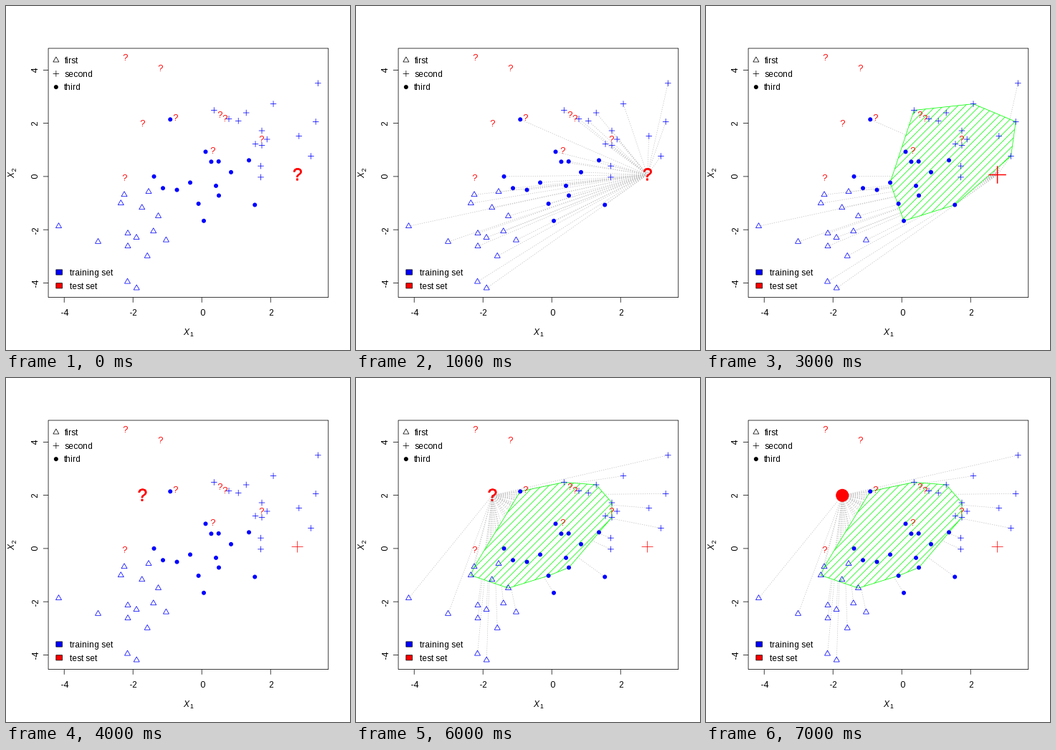
A matplotlib script for the animation above (8 s loop, 480x480 px).

```python
import matplotlib.pyplot as plt
from matplotlib.animation import FuncAnimation
from matplotlib.collections import LineCollection
from matplotlib.patches import Circle, Polygon, Rectangle
from matplotlib.patheffects import withStroke

SIZE = 480
PT = 0.72  # points per pixel at 100 dpi
THIN = 0.75
LINE = 14.4  # margin line height
LEFT, TOP = 4.1 * LINE, 4.1 * LINE
RIGHT, BOTTOM = SIZE - 2.1 * LINE, SIZE - 5.1 * LINE
ZERO = (273.2, 237.9)
UNIT = (48.0, 37.13)
NEIGHBOURS = 25
BLUE, RED, GREEN, GREY = "#0000ff", "#ff0000", "#00ff00", "#bebebe"

plt.rcParams.update({"font.family": "Liberation Sans",
                     "text.hinting_factor": 1})

# Observations: marker centres in pixels, y pointing down
FIRST = [(73.5, 307.3), (128.5, 329), (160.3, 275.3), (165, 263.4), (189.7, 281.4),
         (199, 259.2), (212.5, 293.2), (170, 317.2), (182, 323.2), (205.7, 314.4),
         (223.4, 326.8), (170, 335.2), (197.2, 349), (169.5, 384.8), (182.2, 393.7)]
SECOND = [(290.3, 145.5), (311, 157.5), (324.2, 160.3), (335.2, 149), (373, 136.6),
          (435.3, 107.8), (432.2, 161.4), (408.8, 181.4), (425.5, 209.5), (357, 174),
          (364.2, 186), (348, 192.5), (357, 194.5), (355.5, 223.2), (355.5, 238.9)]
THIRD = [(229.2, 158.3), (206.5, 237.9), (219, 254.2), (238.5, 256.6), (257, 246.4),
         (278.5, 203.4), (286.4, 217.3), (296.7, 216.9), (314, 231.9), (339, 215.3),
         (293, 250.9), (297, 264.5), (268.6, 275.9), (276, 299.8), (347.2, 277.5)]
TESTS = [(166, 71.9), (215, 86.8), (236, 155.8), (298, 152), (304.3, 157.6),
         (356, 185.7), (288.2, 202.6), (165.2, 240.6)]
QUERY_A, QUERY_B = (406.6, 235.5), (190.2, 163.8)
TRAINING = FIRST + SECOND + THIRD

fig = plt.figure(figsize=(4.8, 4.8), dpi=100, facecolor="white")
ax = fig.add_axes([0, 0, 1, 1])
ax.set_xlim(0, SIZE)
ax.set_ylim(SIZE, 0)
ax.axis("off")


def text(x, y, label, size=12, **style):
    return ax.text(x, y, label, fontsize=size * PT, va="baseline",
                   rotation_mode="anchor", **style)


def strokes(segments, color, width=THIN, z=3, **style):
    return ax.add_collection(LineCollection(
        segments, colors=color, linewidths=width * PT, zorder=z,
        snap=False, **style))


def shape(patch, fill, edge, z=4):
    patch.set(facecolor=fill, edgecolor=edge, linewidth=THIN * PT,
              zorder=z, snap=False)
    return ax.add_patch(patch)


def triangle(x, y, color):
    corners = [(x, y - 4.67), (x + 4.04, y + 2.33), (x - 4.04, y + 2.33)]
    shape(Polygon(corners), "none", color)


def plus(x, y, color, half=4.24, width=THIN):
    return strokes([[(x - half, y), (x + half, y)],
                    [(x, y - half), (x, y + half)]], color, width, z=4)


def dot(x, y, color, radius=3):
    return shape(Circle((x, y), radius), color, "none")


def question(x, y, size=12, **style):
    return text(x, y + 0.32 * size, "?", size, color=RED, ha="center",
                zorder=5, **style)


def big_question(x, y):
    heavier = withStroke(linewidth=0.6 * PT, foreground=RED)
    return question(x, y, 24, path_effects=[heavier])


def distance(p, q):
    return sum(((a - b) / u) ** 2 for a, b, u in zip(p, q, UNIT))


def turn(a, b, c):
    return (b[0] - a[0]) * (c[1] - a[1]) - (b[1] - a[1]) * (c[0] - a[0])


def hull(points):
    def half(ordered):
        chain = []
        for p in ordered:
            while len(chain) > 1 and turn(*chain[-2:], p) <= 0:
                chain.pop()
            chain.append(p)
        return chain[:-1]

    ordered = sorted(points)
    return half(ordered) + half(ordered[::-1])


def rays(query):
    return strokes([[query, p] for p in TRAINING], GREY, z=1,
                   linestyles=[(0, (1, 3))], capstyle="round")


def region(query):
    near = sorted(TRAINING, key=lambda p: distance(p, query))[:NEIGHBOURS]
    area = shape(Polygon(hull(near)), "white", GREEN, z=2)
    step = 7.2 * 2 ** 0.5
    starts = [ZERO[0] + n * step for n in range(-30, 31)]
    hatch = strokes([[(x - SIZE, ZERO[1] + SIZE), (x + SIZE, ZERO[1] - SIZE)]
                     for x in starts], GREEN, z=2.5)
    hatch.set_clip_path(area)
    return [area, hatch]


def draw_axes():
    shape(Rectangle((LEFT, TOP), RIGHT - LEFT, BOTTOM - TOP), "none", "black", z=3)
    tick = LINE / 2
    for v in range(-4, 5, 2):
        x, y = ZERO[0] + v * UNIT[0], ZERO[1] - v * UNIT[1]
        strokes([[(LEFT - tick, y), (LEFT, y)]], "black")
        text(LEFT - LINE, y, str(v), ha="center", rotation=90)
        if x < RIGHT:
            strokes([[(x, BOTTOM), (x, BOTTOM + tick)]], "black")
            text(x, 432, str(v), ha="center")
    for x, y, index, angle in ((246.8, 459, "1", 0), (12, 240, "2", 90)):
        text(x, y, "X", style="italic", rotation=angle)
        dx, dy = (2, -9) if angle else (9.5, 2)
        text(x + dx, y + dy, index, 9, rotation=angle)


def draw_legends():
    x = LEFT + 10.8
    for row, (marker, label) in enumerate(((triangle, "first"), (plus, "second"),
                                           (dot, "third"))):
        y = 75.7 + row * 18.7
        marker(x, y, "black")
        text(81.2, y + 4.3, label)
    for y, color, label in ((371.5, BLUE, "training set"), (390.3, RED, "test set")):
        shape(Rectangle((x, y - 3.6), 8.64, 7.2), color, "black")
        text(89, y + 4.3, label)


draw_axes()
draw_legends()
for marker, points in ((triangle, FIRST), (plus, SECOND), (dot, THIRD)):
    for x, y in points:
        marker(x, y, BLUE)
for x, y in TESTS:
    question(x, y)

# Each part with the seconds during which it is shown
parts = [
    (big_question(*QUERY_A), range(0, 3)),
    (plus(*QUERY_A, RED, 12.2, 2 * THIN), range(3, 4)),
    (plus(*QUERY_A, RED, 8), range(4, 8)),
    (question(*QUERY_B), range(0, 4)),
    (big_question(*QUERY_B), range(4, 7)),
    (dot(*QUERY_B, RED, 9), range(7, 8)),
]
for query, start in ((QUERY_A, 1), (QUERY_B, 5)):
    parts.append((rays(query), range(start, start + 3)))
    parts += [(a, range(start + 1, start + 3)) for a in region(query)]


def update(second):
    for artist, shown in parts:
        artist.set_visible(second in shown)
    return [artist for artist, _ in parts]


anim = FuncAnimation(fig, update, frames=8, interval=1000, repeat=True,
                     repeat_delay=0, blit=False)
plt.show()
```
